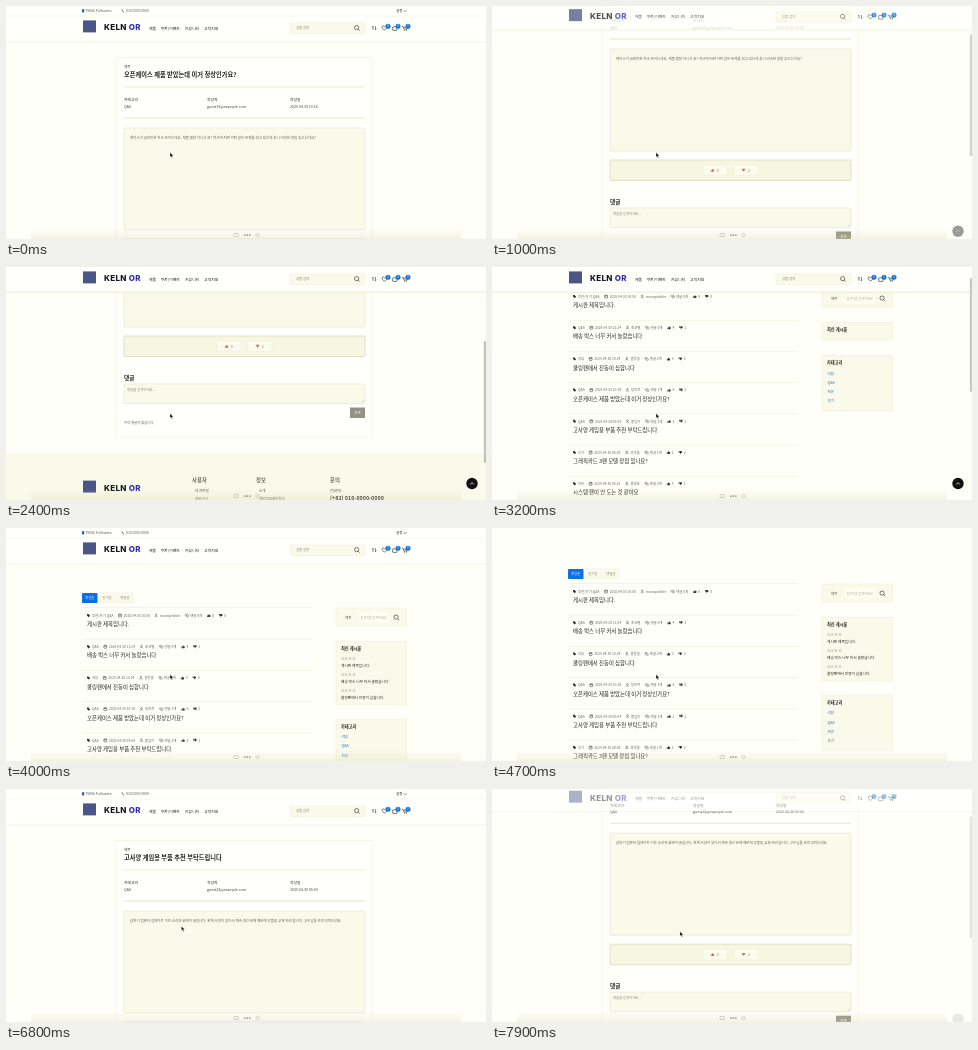
An HTML page with a canvas for the animation above (8 s loop, 480 px wide and 233 px high).

```html
<!DOCTYPE html>
<html lang="ko">
<head>
<meta charset="utf-8">
<title>게시판</title>
<style>
html, body { margin: 0; width: 100%; height: 100%; overflow: hidden; background: #fffffa; }
canvas { display: block; width: 100vw; height: 100vh; }
</style>
</head>
<body>
<canvas id="stage"></canvas>
<script>
const W = 480, H = 233, LOOP = 8000;
const canvas = document.getElementById('stage');
const c = canvas.getContext('2d');
const FONT = '"Noto Sans CJK KR", "Noto Sans CJK", "Noto Sans", sans-serif';
const BG = '#fffffa', PANEL = '#fafaea', LINE = '#e4e4c8', DARK = '#22221e', MUTED = '#84847a', BLUE = '#1274d8';

const clamp = (v, a = 0, b = 1) => Math.min(b, Math.max(a, v));

// Smooth interpolation through [time, value] keys
function track(keys, t) {
  if (t <= keys[0][0]) return keys[0][1];
  for (let i = 1; i < keys.length; i++) {
    const [t0, a] = keys[i - 1], [t1, b] = keys[i];
    if (t <= t1) {
      const p = (t - t0) / (t1 - t0);
      return a + (b - a) * p * p * (3 - 2 * p);
    }
  }
  return keys[keys.length - 1][1];
}

function text(s, x, y, size, color = DARK, weight = 400, align = 'left') {
  c.font = `${weight} ${size}px ${FONT}`;
  c.fillStyle = color;
  c.textAlign = align;
  c.textBaseline = 'alphabetic';
  c.fillText(s, x, y + size * 0.36);
  return c.measureText(s).width;
}

function rect(x0, y0, x1, y1, fill, border, r = 0) {
  c.beginPath();
  c.roundRect(x0, y0, x1 - x0, y1 - y0, r);
  if (fill) { c.fillStyle = fill; c.fill(); }
  if (border) { c.strokeStyle = border; c.lineWidth = 0.6; c.stroke(); }
}

function path(points, color = DARK, width = 0.6, fill) {
  c.beginPath();
  points.forEach(([x, y], i) => i ? c.lineTo(x, y) : c.moveTo(x, y));
  if (fill) { c.closePath(); c.fillStyle = fill; c.fill(); }
  if (color) { c.strokeStyle = color; c.lineWidth = width; c.stroke(); }
}

const rule = (x0, x1, y, color = LINE) => path([[x0, y], [x1, y]], color, 0.7);

function circle(x, y, r, fill, stroke, width = 0.6) {
  c.beginPath();
  c.arc(x, y, r, 0, 7);
  if (fill) { c.fillStyle = fill; c.fill(); }
  if (stroke) { c.strokeStyle = stroke; c.lineWidth = width; c.stroke(); }
}

function lens(x, y) {
  circle(x - 0.4, y - 0.4, 2.1, null, DARK);
  path([[x + 1.2, y + 1.2], [x + 2.7, y + 2.7]]);
}

function brand(y) {
  rect(77, y - 6, 90, y + 6, '#4b5687');
  c.save();
  c.letterSpacing = '0.3px';
  c.font = '800 8px Inter, "Noto Sans", sans-serif';
  c.textAlign = 'left';
  c.fillStyle = '#15171f';
  c.fillText('KELN', 98, y + 3.9);
  const w = c.measureText('KELN ').width;
  c.fillStyle = '#3330b8';
  c.fillText('OR', 98 + w, y + 3.9);
  c.restore();
}

// Main navigation row centred on y
function navRow(y) {
  brand(y - 1.6);
  [['제품', 143], ['쿠폰/이벤트', 154.5], ['커뮤니티', 179], ['고객지원', 198]]
    .forEach(([s, x]) => text(s, x, y + 0.3, 3.9, DARK, 500));
  rect(284, y - 5, 359, y + 5.5, PANEL, '#f0f0da', 1);
  text('상품 검색', 290, y, 3.4, MUTED);
  lens(351, y);
  path([[367, y + 1.8], [367, y - 1.8], [366, y - 0.8]]);
  path([[369.4, y - 1.8], [369.4, y + 1.8], [370.4, y + 0.8]]);
  path([[378.5, y + 2.3], [376, y - 0.2], [376.4, y - 1.8], [377.6, y - 2], [378.5, y - 1.1],
    [379.5, y - 2], [380.7, y - 1.7], [381, y - 0.2], [378.5, y + 2.3]]);
  rect(386.7, y - 1.2, 391, y + 2.4, null, DARK, 0.4);
  path([[396, y - 1.7], [397, y - 1.5], [398, y + 1.1], [401, y + 1.1], [401.7, y - 0.8], [397.3, y - 0.8]]);
  circle(398.4, y + 2.1, 0.5, DARK);
  circle(400.6, y + 2.1, 0.5, DARK);
  [382, 392, 402].forEach(x => {
    circle(x, y - 1.8, 2.5, BLUE);
    text('0', x, y - 1.8, 2.8, '#fff', 500, 'center');
  });
}

function pageHeader() {
  rect(0, 0, W, 36, '#fffffc');
  rect(76, 3.2, 78.2, 6.4, '#3b5998');
  text('7500k Followers', 79.3, 5, 3.5, '#55554e');
  path([[116, 3.4], [116.5, 5], [118.2, 6.4]], '#55554e', 0.8);
  text('010 0000 0000', 120, 5, 3.5, '#55554e');
  text('설정', 390, 5, 3.5, DARK, 500);
  path([[398, 4.4], [399.2, 5.6], [400.4, 4.4]]);
  rule(0, W, 10, '#f6f6e4');
  navRow(22);
  rule(0, W, 36, '#eeeed2');
}

function stickyHeader(p) {
  c.save();
  c.globalAlpha = p;
  c.translate(0, -5 * (1 - p));
  rect(0, -6, W, 25, '#fffffc');
  rule(0, W, 25.2, LINE);
  navRow(12);
  c.restore();
}

const ICONS = {
  tag(x, y) { path([[x, y - 1.5], [x + 1.5, y - 1.5], [x + 3.2, y + 0.3], [x + 1.7, y + 1.7], [x, y]], null, 0, '#33332d'); },
  date(x, y) { rect(x, y - 1.4, x + 2.8, y + 1.5, null, '#55554e', 0.3); rule(x, x + 2.8, y - 0.6, '#55554e'); },
  user(x, y) { circle(x + 1.4, y - 0.8, 0.8, null, '#55554e', 0.5); path([[x, y + 1.6], [x + 0.7, y + 0.6], [x + 2.1, y + 0.6], [x + 2.8, y + 1.6]], '#55554e', 0.5); },
  chat(x, y) { rect(x, y - 1.4, x + 2.4, y + 0.4, null, '#77776c', 0.7); rect(x + 1.2, y - 0.4, x + 3.6, y + 1.4, '#fffffa', '#77776c', 0.7); },
  up(x, y, color) { thumb(x, y, 1, color); },
  down(x, y, color) { thumb(x, y, -1, color); }
};

// Thumb icon, pointing up (s = 1) or down (s = -1)
function thumb(x, y, s, color = '#33332d') {
  c.fillStyle = color;
  c.fillRect(x, y - 0.2 * s, 0.8, 1.7 * s);
  path([[1, 0], [1.9, -1.7], [2.3, -0.4], [3.5, -0.3], [3, 1.5], [1, 1.5]]
    .map(([dx, dy]) => [x + dx, y + dy * s]), null, 0, color);
}

function detail(post) {
  rect(110, 51.5, 366, 334, '#fffffc', '#eeeed2');
  text('제목', 118, 61, 3.6, '#444', 500);
  text(post.title, 118, 69, 6.25, DARK, 700);
  rule(118, 359, 81);
  [['카테고리', 'Q&A', 118], ['작성자', post.mail, 201], ['작성일', post.date, 284]].forEach(([k, v, x]) => {
    text(k, x, 94, 3.8, DARK, 500);
    text(v, x, 101, 3.6, '#44443e');
  });
  rule(118, 359, 112, '#d8d8bc');
  rect(118, 122, 359, 224, PANEL, LINE, 1);
  text(post.body, 124, 132, 3.5, '#606058');

  rect(118, 233, 359, 253.5, '#f6f6e2', '#d2d2b0', 1);
  [['up', 0, 223], ['down', 2, 254]].forEach(([icon, n, x]) => {
    const color = '#cf6a4c';
    rect(x - 12, 238, x + 12, 248.5, '#fcfcee', '#f0f0d6', 1);
    ICONS[icon](x - 4.2, 243.2, color);
    text(String(n), x + 1.8, 243.2, 3.8, color);
  });

  text('댓글', 118, 275, 5.7, DARK, 700);
  rect(118, 281, 359, 300.5, PANEL, LINE, 1);
  text('댓글을 입력하세요...', 121, 287, 3.4, '#8a8a80');
  path([[356, 299.5], [358, 297.5]], MUTED, 0.4);
  rect(344, 304.5, 359, 315, '#929285');
  text('등록', 351.5, 309.8, 3.6, '#fffff0', 400, 'center');
  text('아직 댓글이 없습니다.', 118, 319.5, 3.4, '#5c5c54');

  rect(0, 350, W, 440, PANEL);
  brand(383.6);
  [['사용자', 186], ['정보', 250], ['문의', 324]].forEach(([s, x]) => text(s, x, 377, 5.4, DARK, 500));
  text('내 프로필', 189, 387.5, 3.5, '#55554e');
  text('장바구니', 189, 396, 3.5, '#55554e');
  text('소개', 253, 387.5, 3.5, '#55554e');
  text('개인정보처리방침', 253, 396, 3.5, '#55554e');
  text('전화번호', 324, 387.5, 3.2, '#55554e');
  text('(+82) 010-0000-0000', 324, 394.8, 5.4, DARK, 700);
}

const POSTS = [
  { title: '게시판 제목입니다.', cat: '추천/후기,Q&A', user: 'moonpebble', at: '30 10:58', n: [0, 0, 0] },
  { title: '배송 박스 너무 커서 놀랐습니다', cat: 'Q&A', user: '초코별', at: '30 11:24', n: [0, 4, 1] },
  { title: '쿨링팬에서 진동이 심합니다', cat: '리뷰', user: '솔방울', at: '30 10:24', n: [2, 3, 0] },
  { title: '오픈케이스 제품 받았는데 이거 정상인가요?', cat: 'Q&A', user: '달토끼', at: '30 10:18', n: [1, 6, 2] },
  { title: '고사양 게임용 부품 추천 부탁드립니다', cat: 'Q&A', user: '풀잎이', at: '30 09:04', n: [2, 2, 1] },
  { title: '그래픽카드 3팬 모델 장점 있나요?', cat: '후기', user: '조약돌', at: '30 08:03', n: [1, 1, 2] },
  { title: '시스템 팬이 안 도는 것 같아요', cat: '자유', user: '물결표', at: '30 06:19', n: [3, 5, 1] },
  { title: '케이스 팬 커넥터 부족할 때 해결 방법?', cat: 'Q&A', user: '해바람', at: '30 02:37', n: [2, 4, 2] },
  { title: '모니터 주사율 설정 질문입니다', cat: 'Q&A', user: '구름이', at: '29 22:10', n: [1, 2, 0] }
];

const DETAILS = [
  { title: POSTS[3].title, mail: 'guest19@example.com', date: '2025.04.30 10:18',
    body: '케이스가 긁힌듯한 자국 보이는데요. 제품 불량 아니신 분? 최근에 저만 이런 같은 문제를 겪고 있는데 혹시 비슷한 경험 있으신가요?' },
  { title: POSTS[4].title, mail: 'guest24@example.com', date: '2025.04.30 09:04',
    body: '갑자기 컴퓨터 업데이트 이후 소리와 화면이 끊깁니다. 현재 사양이 낮아서 계속 생긴 문제 때문에 부품을 교체 하려 합니다. 고수님들 조언 부탁드려요.' }
];

function meta(post, y) {
  let x = 81;
  [['tag', post.cat], ['date', '2025.04.' + post.at], ['user', post.user],
    ['chat', `댓글 ${post.n[0]}개`], ['up', post.n[1]], ['down', post.n[2]]].forEach(([icon, s]) => {
    ICONS[icon](x, y);
    x += 5 + text(String(s), x + 5, y, 3.4, '#66665c') + 5;
  });
}

function list(loaded, hover) {
  [['최신순', 76, 91.5], ['인기순', 93, 109], ['댓글순', 111, 127]].forEach(([s, a, b], i) => {
    rect(a, 65, b, 75, i ? PANEL : '#0b70e8', i ? '#f0f0da' : null, 0.8);
    text(s, (a + b) / 2, 70, 3.4, i ? '#88887c' : '#fff', 400, 'center');
  });
  rule(76, 306, 79.5, '#f0f0da');
  POSTS.forEach((post, i) => {
    const y = 96.2 + i * 31.2;
    meta(post, y - 8.7);
    text(post.title, 81, y, 5.4, DARK, i === hover ? 700 : 500);
    rule(76, 306, y + 15, '#eeeed6');
  });

  rect(330, 80, 400.5, 98, PANEL, '#eeeed6');
  text('제목', 339, 89.5, 3.5, '#55554e');
  rect(353, 84.5, 383, 94.5, '#fdfdf2');
  text('검색어를 입력하세요', 354.5, 89.5, 3.1, '#b0b0a0');
  lens(390.5, 89.5);

  rect(330, 113.5, 400.5, loaded ? 177 : 131, PANEL, '#eeeed6');
  text('최신 게시물', 335, 120, 4.2, DARK, 700);
  if (loaded) POSTS.slice(0, 3).forEach((post, i) => {
    text('2025.04.30', 335, 131.2 + i * 16, 2.9, '#9a9a8c');
    text(post.title, 335, 138 + i * 16, 3.7, DARK, 500);
  });

  const top = loaded ? 191 : 146.5;
  rect(330, top, 400.5, top + 55, PANEL, '#eeeed6');
  text('카테고리', 335, top + 7, 4.2, DARK, 700);
  ['리뷰', 'Q&A', '자유', '후기'].forEach((s, i) => text(s, 335.5, top + 18 + i * 9.2, 3.6, BLUE));
}

function topButton(p) {
  const alpha = p ** 3;
  c.save();
  c.globalAlpha = alpha;
  c.translate(0, 15 * (1 - alpha));
  circle(466, 216.5, 5.7, '#10110f');
  path([[464.3, 217.4], [466, 215.7], [467.7, 217.4]], '#fff', 0.8);
  c.restore();
}

function scrollThumb(top, length, alpha) {
  c.save();
  c.globalAlpha = alpha;
  rect(477.8, top, 480, top + length, '#bcbcae', null, 1);
  c.restore();
}

function bottomBar() {
  const g = c.createLinearGradient(0, 222, 0, 233);
  g.addColorStop(0, 'rgba(215,215,175,0)');
  g.addColorStop(1, 'rgba(215,215,175,.3)');
  c.fillStyle = g;
  c.fillRect(25, 222, 430, 11);
  rect(228, 227.5, 232.5, 230.5, null, '#b4b4a4', 0.7);
  [238, 240.5, 243].forEach(x => rect(x, 228.4, x + 1.6, 229.8, '#8c8c7e'));
  circle(251.5, 229, 1.6, null, '#bcbcac');
}

function pointer(x, y) {
  path([[x, y], [x, y + 4.6], [x + 1.1, y + 3.7], [x + 1.9, y + 5.4], [x + 2.7, y + 5], [x + 1.9, y + 3.4], [x + 3.3, y + 3.3]],
    '#fff', 0.4, '#000');
}

const OPEN_LIST = 2900, LOADED = 3300, OPEN_POST = 6050;
const SCROLL = [[450, 0], [1000, 79], [1500, 164], [OPEN_LIST, 164], [3200, 58], [3650, 0], [4400, 0], [5300, 92],
  [OPEN_POST, 92], [6280, 0], [7450, 0], [7900, 77.8], [8000, 92]];
const POINTER_X = [[4700, 164], [5500, 148], [6300, 148], [7100, 188]];
const POINTER_Y = [[4700, 146.5], [5500, 125.5], [6300, 125.5], [7100, 142.5]];
const STICKY = [[625, 3450], [4700, 6200], [7675, 8100]];

function draw(t) {
  const scroll = track(SCROLL, t);
  const span = STICKY.find(([a, b]) => t >= a && t < b);
  const stuck = span ? clamp((t - span[0]) / 500) : 0;
  const inList = t >= OPEN_LIST && t < OPEN_POST;

  rect(0, 0, W, H, BG);
  c.save();
  c.translate(0, -scroll);
  if (inList) list(t >= LOADED, t > 5300 ? 4 : -1);
  else detail(DETAILS[t < OPEN_LIST ? 0 : 1]);
  if (!span) pageHeader();
  c.restore();

  if (span) {
    stickyHeader(stuck);
    topButton(stuck);
    if (inList) scrollThumb(scroll * 0.19, 114, stuck * 0.8);
    else scrollThumb(Math.max(0, scroll * 0.54 - 14.5), 122, stuck * 0.9);
  }
  bottomBar();
  pointer(track(POINTER_X, t), track(POINTER_Y, t));
}

function resize() {
  const d = window.devicePixelRatio || 1;
  canvas.width = Math.round(innerWidth * d);
  canvas.height = Math.round(innerHeight * d);
}
addEventListener('resize', resize);
resize();

const start = performance.now();
function tick(now) {
  c.setTransform(canvas.width / W, 0, 0, canvas.height / H, 0, 0);
  draw(Math.max(0, now - start) % LOOP);
  requestAnimationFrame(tick);
}
tick(start);
</script>
</body>
</html>
```
